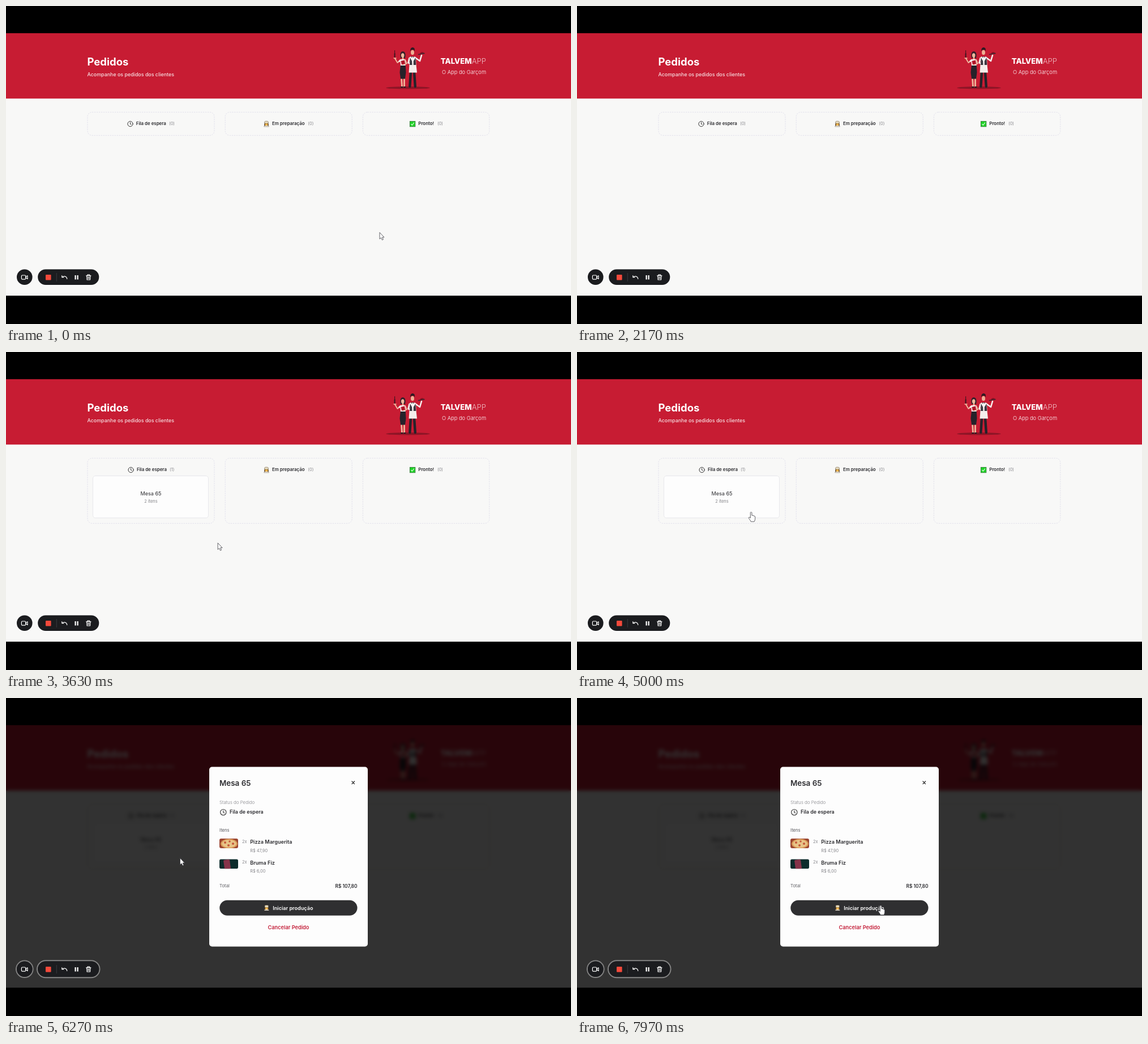
Animation of 998x561 px, one loop 8 s. Source, as an HTML page:

```html
<!DOCTYPE html>
<html lang="pt-BR">
<head>
<meta charset="utf-8">
<title>Pedidos</title>
<style>
  html, body { margin: 0; width: 100%; height: 100%; overflow: hidden; background: #000; }
  svg.layer { position: absolute; left: 0; top: 0; width: 998px; height: 561px; }
  .shade { position: absolute; left: 0; top: 48px; width: 998px; height: 463px;
    background: rgba(0, 0, 0, .8); backdrop-filter: blur(3px); }
  text { font-family: Inter, "Open Sans", sans-serif; fill: #2c2c30; }
  .bold { font-weight: 600; }
  .head { font-size: 7.9px; }
  .item { font-size: 9.1px; }
  .soft { fill: #85858a; font-size: 7.4px; }
  .mid { text-anchor: middle; }
  .white { fill: #fff; }
  .line { fill: none; stroke-linecap: round; stroke-linejoin: round; }
  .col { fill: none; stroke: #dfdeea; stroke-width: .9; stroke-dasharray: 2.4 1.6; }
</style>
</head>
<body>

<svg class="layer" viewBox="0 0 998 561">
  <defs>
    <g id="clock" class="line" stroke="#333" stroke-width="1">
      <circle r="4.6"/><path d="M0-2.6V.2L1.7 1.2"/>
    </g>
    <g id="chef">
      <path d="M-3.4-1.5H3.4L4 3H-4Z" fill="#5a4026"/>
      <path d="M-4.3 4.8Q-4.2 2.4 0 2.4T4.3 4.8Z" fill="#f1ece0" stroke="#5a4a38" stroke-width=".5"/>
      <circle cy=".5" r="2.5" fill="#f3b950"/>
      <path d="M-3-1L-3.4-3.6Q-3-4.9 0-4.8T3.4-3.6L3-1Z" fill="#efe4c6" stroke="#5a4a38" stroke-width=".6"/>
    </g>
  </defs>

  <rect y="48" width="998" height="463" fill="#f8f8f7"/>
  <rect y="48" width="998" height="115.3" fill="#c71c33"/>
  <text class="bold white" x="143.5" y="105.3" font-size="18.5" style="font-weight:700">Pedidos</text>
  <text class="white" x="143.5" y="124" font-size="8.9" opacity=".86" font-weight="500">Acompanhe os pedidos dos clientes</text>

  <!-- two waiters -->
  <ellipse cx="710" cy="144.3" rx="39" ry="2.2" fill="#8d1526"/>
  <g class="line">
    <path d="M698.5 127L699.5 142M703.5 127L703.5 142" stroke="#eeb59a" stroke-width="2.8"/>
    <path d="M698 143H700.5M703 143H705.5" stroke="#201c22" stroke-width="1.8"/>
    <path d="M715 116L713.3 142M721 116L722.8 142" stroke="#25222a" stroke-width="4.4"/>
    <path d="M696.5 96L691.5 100L687 92.5" stroke="#eeb59a" stroke-width="2"/>
    <path d="M696.8 95.5L694.6 97.5" stroke="#f6efee" stroke-width="3"/>
    <path d="M724 92L731 97L734 87" stroke="#f6efee" stroke-width="2.6"/>
    <path d="M712.5 92L710.5 100L716 103" stroke="#f6efee" stroke-width="2.6"/>
    <path d="M685 92H689" stroke="#eeb59a" stroke-width="1.6"/>
    <path d="M686.6 90V84" stroke="#3c1520" stroke-width="2"/>
    <path d="M686.6 84V78.5" stroke="#3c1520" stroke-width="1.1"/>
    <path d="M728.5 85.5L739 83.5" stroke="#332a31" stroke-width="1.3"/>
  </g>
  <path d="M731 84.2Q733 79 738.5 82.6Z" fill="#7d1021"/>
  <path d="M696.5 88Q696 80 701 80Q706 80.5 705.5 88L705 92H697Z" fill="#33202a"/>
  <path d="M699.5 89H702.5V95H699.5Z" fill="#e5a98c"/>
  <ellipse cx="700.7" cy="87" rx="2.8" ry="3.8" fill="#f0b99d"/>
  <path d="M696 94.5Q701 92.8 706 94.5L705.5 106H697Z" fill="#f8f1f0"/>
  <path d="M705.5 96L708 101.5L701 103" class="line" stroke="#eeb59a" stroke-width="2"/>
  <path d="M696.8 105H705.8L706.5 117L705 128.5H697L695.5 117Z" fill="#25222a"/>
  <path d="M697.5 97L704 95.5L705 102L698.8 103.5Z" fill="#b11328"/>
  <path d="M712.8 90Q718 88 724 90L724.5 105H712.5Z" fill="#f8f1f0"/>
  <path d="M713.5 91L717 97L717.5 106H713ZM723.5 91L719.8 97L719.8 106H724.2Z" fill="#3a3740"/>
  <path d="M712.5 104H724.5L726 117.5H711.5Z" fill="#f4eeec"/>
  <ellipse cx="718" cy="82" rx="3" ry="4.3" fill="#eeb295"/>
  <path d="M714.2 80Q713.8 73 718.5 73Q723 73.5 721.6 80L720.3 77.3H716Z" fill="#2c1b22"/>
  <path d="M716 88.8L720.4 91V88.8L716 91Z" fill="#1d1a20"/>

  <text class="white" x="767.8" y="102.2" font-size="13.2"><tspan font-weight="800">TALVEM</tspan><tspan font-weight="300" opacity=".85" fill="#f7d8dc">APP</tspan></text>
  <text class="white mid" x="809" y="119.6" font-size="9.4" font-weight="300">O App do Garçom</text>

  <rect class="col" x="144" y="187.3" width="224" height="41" rx="8"/>
  <rect class="col" x="387.2" y="187.3" width="224" height="41" rx="8"/>
  <rect class="col" x="630.4" y="187.3" width="223.4" height="41" rx="8"/>

  <g id="queue">
    <use href="#clock" x="219.5" y="208"/>
    <text class="bold head" x="229.8" y="210.4">Fila de espera</text>
    <text id="count" class="soft" x="288" y="210.4">(0)</text>
  </g>
  <use href="#chef" x="460" y="208"/>
  <text class="bold head" x="470" y="210.4">Em preparação</text>
  <text class="soft" x="533.3" y="210.4">(0)</text>
  <rect x="713.4" y="203.4" width="9.4" height="9.4" fill="#1fd326" stroke="#2f7a34" stroke-width=".9"/>
  <path class="line" d="M715.6 208.3L717.4 210.1L720.6 206" stroke="#e9ffe9" stroke-width="1.1"/>
  <text class="bold head" x="728.3" y="210.4">Pronto!</text>
  <text class="soft" x="762" y="210.4">(0)</text>

  <g id="card">
    <rect x="153.5" y="218.5" width="204" height="74.3" rx="4.5" fill="#fdfdfd" stroke="#e6e6ea" stroke-width=".9"/>
    <text class="mid" x="256" y="252.6" font-size="9.1">Mesa 65</text>
    <text class="mid soft" x="256" y="265.8">2 ítens</text>
  </g>
</svg>

<div class="shade" id="shade"></div>

<svg class="layer" viewBox="0 0 998 561">
  <g id="dialog">
    <rect x="359" y="121.5" width="280" height="317" rx="5" fill="#fdfdfd"/>
    <text class="bold" x="377" y="154.6" font-size="13.4">Mesa 65</text>
    <path class="line" d="M611 147L615.6 151.6M615.6 147L611 151.6" stroke="#222" stroke-width="1.2"/>
    <text class="soft" x="377" y="186.8" style="font-size:7.9px;font-weight:300">Status do Pedido</text>
    <use href="#clock" transform="translate(383.8 201.6) scale(1.12)"/>
    <text class="bold" x="395" y="204.2" font-size="8.9">Fila de espera</text>
    <text x="377" y="235.6" font-size="7.6" style="fill:#55555a">Itens</text>

    <clipPath id="thumb"><rect width="33" height="17" rx="3"/></clipPath>
    <g transform="translate(377 248)" clip-path="url(#thumb)">
      <rect width="33" height="17" fill="#9c4631"/>
      <ellipse cx="17" cy="9" rx="15" ry="8.5" fill="#d99a58"/>
      <ellipse cx="17" cy="9" rx="12.5" ry="6.7" fill="#e8c488"/>
      <g fill="#c65a3b"><circle cx="10" cy="7" r="2"/><circle cx="16" cy="12" r="2"/><circle cx="18" cy="5" r="1.8"/><circle cx="24" cy="9" r="2.1"/></g>
    </g>
    <g transform="translate(377 284.3)" clip-path="url(#thumb)">
      <rect width="33" height="17" fill="#0d2c2c"/>
      <rect x="8" y="1" width="11" height="17" rx="2" fill="#86344a" transform="rotate(-8 13 9)"/>
    </g>

    <text class="soft" x="417" y="256.2">2x</text>
    <text class="bold item" x="431.2" y="257.3">Pizza Marguerita</text>
    <text class="soft" x="431.2" y="271.8">R$ 47,90</text>
    <text class="soft" x="417" y="292.4">2x</text>
    <text class="bold item" x="431.2" y="293.8">Bruma Fiz</text>
    <text class="soft" x="431.2" y="308.3">R$ 6,00</text>
    <text class="soft" x="377" y="334.2" style="fill:#626267;font-size:7.8px">Total</text>
    <text class="bold" x="620.5" y="334.6" font-size="8.4" text-anchor="end">R$ 107,80</text>

    <rect x="377.3" y="356.7" width="243.2" height="27" rx="13.5" fill="#2f2f31"/>
    <use href="#chef" x="460.3" y="370.3"/>
    <text class="bold item white" x="471.2" y="373.5">Iniciar produção</text>
    <text class="bold mid" x="499" y="408.4" font-size="9.2" style="fill:#c4203a">Cancelar Pedido</text>
  </g>

  <!-- recorder controls -->
  <g fill="#1b1c1f">
    <g fill="none" stroke="#fff" stroke-opacity=".4" stroke-width="2">
      <circle cx="32.8" cy="478.3" r="14.8"/><rect x="55" y="463.3" width="110.5" height="30" rx="15"/>
    </g>
    <circle cx="32.8" cy="478.3" r="13.8"/>
    <rect x="56.2" y="464.5" width="108.1" height="27.6" rx="13.8"/>
  </g>
  <rect x="70" y="474" width="9.6" height="9.6" rx="1" fill="#f5493b"/>
  <path d="M89.3 471V486" stroke="#3a3b3f"/>
  <g class="line" stroke="#fff" stroke-width="1.2">
    <rect x="27.4" y="475" width="7.2" height="7.2" rx="1.4"/>
    <path d="M35 477.8L38 475.8V481.4L35 479.2"/>
    <path d="M98.8 475.6V478.6H101.8M99 478.4Q102.5 475.6 105.6 477.6Q107.6 479 107.8 481.4"/>
    <path d="M141.6 475.8H150M143.8 475.6V474.2H147.8V475.6M142.6 475.8L143.1 483H148.5L149 475.8M144.8 478V481M146.8 478V481"/>
  </g>
  <path d="M122.6 475V482.4M126.6 475V482.4" stroke="#fff" stroke-width="2.2"/>

  <g id="cursor" fill="#fff" stroke="#3c3c42" stroke-width=".8" stroke-linejoin="round">
    <path id="arrow" d="M0 0V11.6L2.6 9.3L4.4 13.3L6.4 12.4L4.6 8.5H8Z"/>
    <path id="hand" d="M-1.2.9Q-.9-.3.2 0Q1.3.2 1.4 1.4V5.8Q2.4 5 3.5 6.2Q4.6 5.6 5.4 6.9Q7 6.6 7.1 8.4V11.8Q7 14.6 5.6 16.7H-.3Q-1.6 14-3.8 11.2Q-5 9.3-3.6 8.9Q-2.5 8.8-1.2 10.4Z"/>
  </g>
</svg>

<script>
const LOOP = 8000, CARD_AT = 2770, DIALOG_AT = 5030;
const $ = id => document.getElementById(id);
const show = (el, on) => { el.style.display = on ? "" : "none"; };
const cols = document.querySelectorAll(".col");

// time, x, y, 1 = passes through without stopping
const path = [
  [30, 660, 399.5, 0], [770, 1004, 330, 0],
  [2170, 1004, 430, 0], [2570, 628, 398, 0],
  [3170, 628, 398, 0], [3630, 374.5, 337, 1], [4000, 307.5, 282.5, 0],
  [6270, 307.5, 282.5, 0], [6870, 552.5, 353.5, 1], [7100, 545, 369.5, 1], [7400, 536.5, 366, 0]
];
const handSpans = [[4000, 6270], [6930, LOOP]];

function slope(i, k) {
  if (!path[i][3]) return 0;
  const a = path[i - 1], b = path[i + 1];
  return (b[k] - a[k]) / (b[0] - a[0]);
}

// cubic Hermite curve through the keys
function place(t, k) {
  const last = path.length - 1;
  if (t <= path[0][0]) return path[0][k];
  if (t >= path[last][0]) return path[last][k];
  const i = path.findIndex(p => p[0] > t) - 1;
  const a = path[i], b = path[i + 1], d = b[0] - a[0];
  const u = (t - a[0]) / d, s = u * u * (3 - 2 * u);
  return a[k] + (b[k] - a[k]) * s
    + d * u * (1 - u) * ((1 - u) * slope(i, k) - u * slope(i + 1, k));
}

function draw(t) {
  const ordered = t >= CARD_AT, open = t >= DIALOG_AT;
  cols.forEach(c => c.setAttribute("height", ordered ? 115 : 41));
  show($("card"), ordered);
  $("count").textContent = ordered ? "(1)" : "(0)";
  $("queue").setAttribute("transform", `translate(${ordered ? 1.1 : 0} 0)`);
  show($("shade"), open);
  show($("dialog"), open);

  const hand = handSpans.some(([a, b]) => t >= a && t < b);
  show($("hand"), hand);
  show($("arrow"), !hand);
  show($("cursor"), t < 770 || t > 2170);
  $("cursor").setAttribute("transform", `translate(${place(t, 1)} ${place(t, 2)})`);
}

const start = performance.now();
function tick() {
  draw((performance.now() - start) % LOOP);
  requestAnimationFrame(tick);
}
tick();
</script>
</body>
</html>
```
